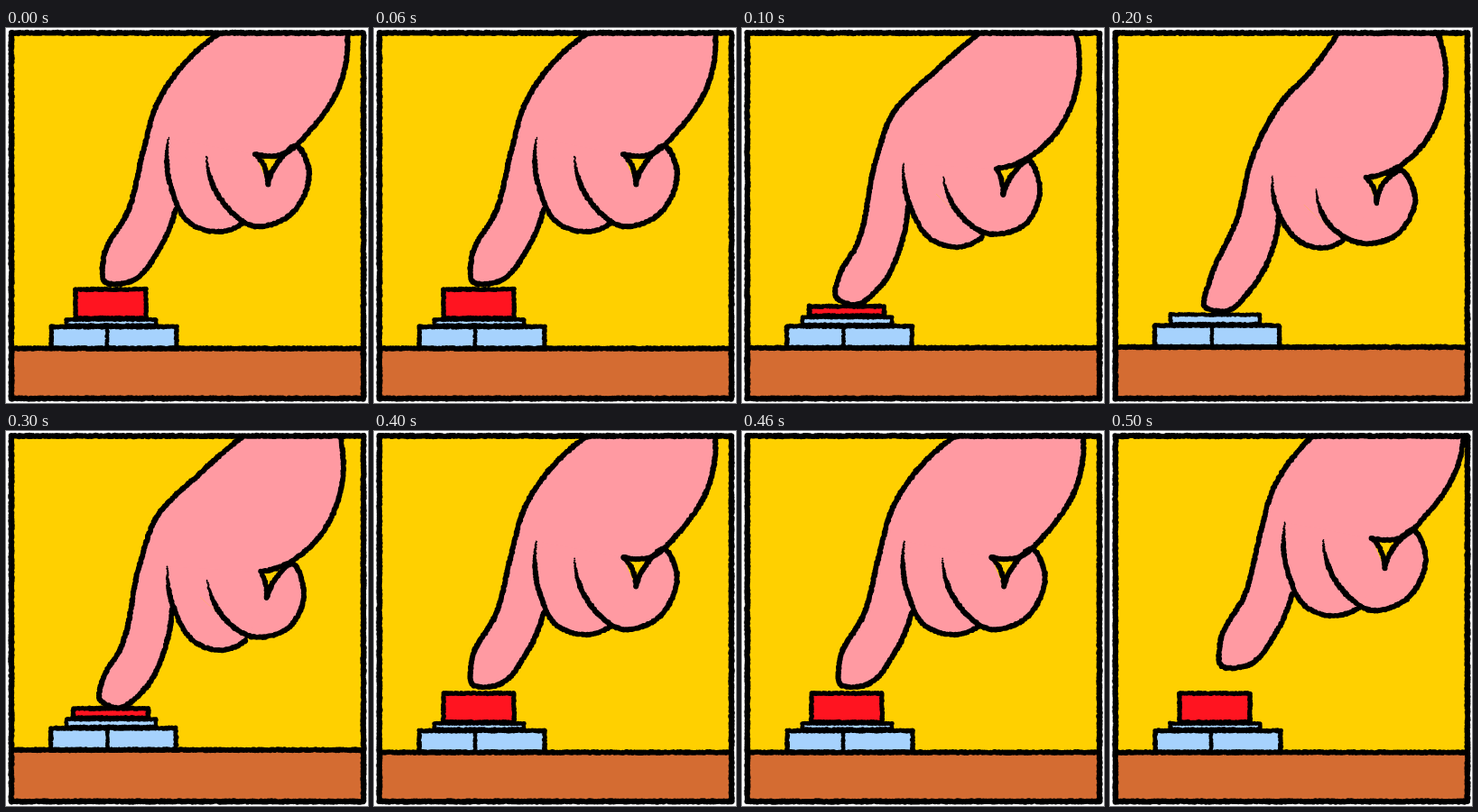
An HTML page with a canvas that plays this animation: 401 px wide and 416 px high, repeating every 600 ms.

```html
<!DOCTYPE html>
<html lang="en">
<head>
<meta charset="utf-8">
<title>Finger pressing a red button</title>
<style>
html, body { margin: 0; width: 100%; height: 100%; overflow: hidden; background: #fff; }
canvas { display: block; width: 100vw; height: 100vh; }
</style>
</head>
<body>
<canvas id="stage" width="401" height="416"></canvas>
<script>
const ctx = document.getElementById('stage').getContext('2d');
const INK = '#000', YELLOW = '#ffd000', BROWN = '#d46c32';
const PINK = '#ff9aa2', RED = '#ff1420', BLUE = '#a6d2fd';
const STEP_MS = 100;

// Key points of the hand, from touching the button to pushing it all the way in
const hands = [
  {
    index: [[236,6],[213,24],[167,85],[152,137],[136,201],[108,256],[109,281],[136,282],[172,241],[188,201]],
    middle: [[180,122],[184,181],[203,216],[236,226],[262,217]],
    ring: [[222,142],[240,193],[276,220],[314,208],[335,155],[322,131],[299,152],[290,173]],
    wrist: [[378,6],[371,60],[340,110],[303,141],[276,140]]
  },
  {
    index: [[262,6],[215,47],[166,97],[148,148],[126,243],[108,274],[104,298],[125,307],[152,288],[177,238],[184,197]],
    middle: [[179,150],[186,197],[212,236],[240,243],[266,232]],
    ring: [[223,166],[239,204],[272,228],[312,219],[330,180],[317,147],[296,168],[289,185]],
    wrist: [[370,6],[372,60],[345,120],[300,152],[282,156]]
  },
  {
    index: [[252,6],[223,47],[190,82],[158,143],[141,211],[110,282],[105,309],[128,314],[159,286],[184,231],[187,208]],
    middle: [[180,164],[188,208],[212,238],[236,244],[258,236]],
    ring: [[228,179],[243,218],[274,238],[315,231],[338,188],[322,158],[302,174],[295,194]],
    wrist: [[363,5],[372,58],[352,122],[310,159],[284,166]]
  }
];

// depth: how far the button is in; table: height of the table edge
const steps = [
  { depth: 0, table: 355.5 },
  { depth: 1, table: 354.8 },
  { depth: 2, table: 354 },
  { depth: 1, table: 353.8 },
  { depth: 0, table: 356.5 },
  { depth: 0, table: 356.5, shift: [14, -21] }
];

let seed = 1;
function rnd() {
  seed = (seed * 16807) % 2147483647;
  return seed / 2147483647 - 0.5;
}

const last = list => list[list.length - 1];
const mix = (p, q, f) => p.map((v, k) => f(v, q[k]));

// Smooth curve through unevenly spaced points, sampled about once per pixel
function curve(p) {
  const n = p.length - 1, len = [], slope = [];
  for (let i = 0; i < n; i++) {
    len[i] = Math.hypot(p[i + 1][0] - p[i][0], p[i + 1][1] - p[i][1]);
    slope[i] = mix(p[i], p[i + 1], (a, b) => (b - a) / len[i]);
  }
  const vel = p.map((_, i) => i % n
    ? mix(slope[i - 1], slope[i], (a, b) => (len[i] * a + len[i - 1] * b) / (len[i - 1] + len[i]))
    : slope[i ? n - 1 : 0]);
  if (n > 1) {
    vel[0] = mix(slope[0], vel[1], (s, v) => 2 * s - v);
    vel[n] = mix(slope[n - 1], vel[n - 1], (s, v) => 2 * s - v);
  }
  const out = [];
  for (let i = 0; i < n; i++) {
    const count = Math.ceil(len[i]);
    for (let j = 0; j < count; j++) {
      const t = j / count, u = 1 - t, ease = t * t * (3 - 2 * t);
      out.push([0, 1].map(k => p[i][k] + (p[i + 1][k] - p[i][k]) * ease
        + len[i] * t * u * (u * vel[i][k] - t * vel[i + 1][k])));
    }
  }
  out.push(p[n]);
  return out;
}

// Rough ink line made of jittered dots
function ink(points, width, taper = 0) {
  ctx.fillStyle = INK;
  ctx.beginPath();
  curve(points).forEach(([x, y], i) => {
    const grow = taper ? Math.min(1, 0.3 + 0.7 * i / taper) : 1;
    const r = (width / 2 - 0.2 + rnd() * 0.5) * grow;
    const cx = x + rnd() * 1.2, cy = y + rnd() * 1.2;
    ctx.moveTo(cx + r, cy);
    ctx.arc(cx, cy, r, 0, 7);
  });
  ctx.fill();
}

function fill(points, color) {
  ctx.fillStyle = color;
  ctx.beginPath();
  points.forEach(([x, y]) => ctx.lineTo(x, y));
  ctx.fill();
}

function box(mid, width, top, bottom, color, line) {
  const l = mid - width / 2, r = mid + width / 2;
  const corners = [[l, top], [r, top], [r, bottom], [l, bottom]];
  if (color) fill(corners, color);
  corners.forEach((c, i) => ink([c, corners[(i + 1) % 4]], line));
}

function drawButton(depth, table) {
  const base = table - 24, plate = base - 8 - 2 * depth, cap = plate - 1.5;
  const seam = 112 + depth / 2;
  box(119.5 - depth / 2, 139 - depth / 2, base, table, BLUE, 5.4);
  ink([[seam, base], [seam, table]], 4.6);
  box(116.5, 99, plate, base - 1.5, BLUE, 4.8);
  if (depth < 2) box(116, 78 + 5 * depth, cap - 32 + 21.5 * depth, cap, RED, 5.4);
}

function drawHand({ index, middle, ring, wrist }, [dx, dy]) {
  const tip = last(ring), heel = last(wrist);
  const notch = [heel, [heel[0] + 0.65 * (tip[0] - heel[0]), heel[1] + 0.35 * (tip[1] - heel[1])], tip];
  ctx.save();
  ctx.beginPath();
  ctx.rect(5, 4, 392, 408);
  ctx.clip();
  ctx.translate(dx, dy);
  fill([...curve(index), ...curve(wrist).reverse()], PINK);
  fill(curve(middle), PINK);
  fill(curve(ring), PINK);
  fill([middle[0], heel, tip, last(middle)], PINK);
  ink(index, 6);
  ink(middle, 5.8, 28);
  ink(ring, 6, 28);
  ink(wrist, 6);
  ink(notch, 5.6);
  ctx.restore();
}

function draw(i) {
  const { depth, table, shift = [0, 0] } = steps[i];
  seed = 4001 + i * 977;
  ctx.fillStyle = '#fff';
  ctx.fillRect(0, 0, 401, 416);
  ctx.fillStyle = YELLOW;
  ctx.fillRect(6, 5, 390, 406);
  ctx.fillStyle = BROWN;
  ctx.fillRect(6, table, 390, 411 - table);
  drawButton(depth, table);
  ink([[6, table], [396, table]], 6);
  drawHand(hands[depth], shift);
  box(201, 390, 5.5, 411, null, 6.4);
}

let shown = 0;
const start = performance.now();
function tick(now) {
  const i = Math.floor(Math.max(0, now - start) / STEP_MS) % steps.length;
  if (i !== shown) draw(shown = i);
  requestAnimationFrame(tick);
}
draw(0);
requestAnimationFrame(tick);
</script>
</body>
</html>
```
